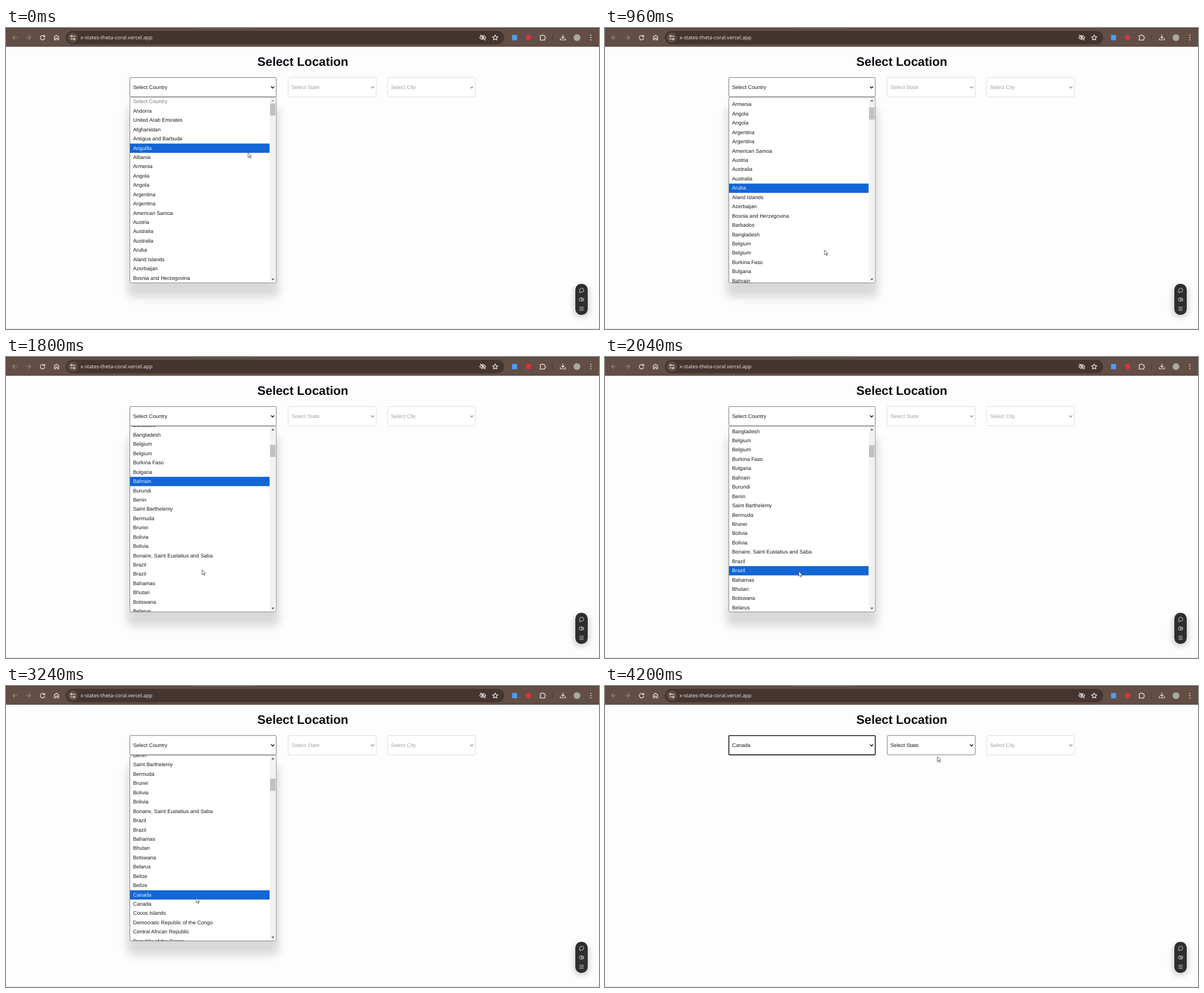
An HTML page for the animation above (4.32 s loop, 1051 by 533 pixels).

```html
<!DOCTYPE html>
<html lang="en">
<head>
<meta charset="utf-8">
<title>Select Location</title>
<style>
html, body { margin: 0; width: 100%; height: 100%; overflow: hidden; background: #fdfdfd; }
svg { display: block; width: 100vw; height: 100vh; }
text { font-family: "Liberation Sans", Arial, sans-serif; font-size: 9.28px; fill: #1c1c1c; white-space: pre; text-rendering: geometricPrecision; }
.title { font-size: 21.8px; font-weight: bold; fill: #0c0c14; }
.url { font-family: "Open Sans", "Noto Sans", sans-serif; font-size: 9.1px; fill: #f3ebe7; }
.icon { fill: none; stroke: #f0e6e1; stroke-width: 1.2; stroke-linecap: round; stroke-linejoin: round; }
.dim { stroke: #9b877d; }
.tool { fill: none; stroke: #c9cacc; stroke-width: 1; stroke-linecap: round; }
.chev { fill: none; stroke-width: 1.5; }
</style>
</head>
<body>
<svg viewBox="0 0 1051 533" preserveAspectRatio="none">
  <defs>
    <filter id="soft" x="-20%" y="-20%" width="140%" height="140%"><feGaussianBlur stdDeviation="8"/></filter>
    <filter id="glow" x="-80%" y="-50%" width="260%" height="200%"><feGaussianBlur stdDeviation="5"/></filter>
    <clipPath id="listClip"><rect x="219.7" y="123" width="258.8" height="328" rx="2"/></clipPath>
  </defs>
  <rect width="1051" height="533" fill="#fdfdfd"/>

  <g id="bar">
    <rect width="1051" height="33" fill="#634e45"/>
    <path d="M0 0H333V1H0ZM437 0H1051V1H437Z" fill="#4d3d36"/>
    <rect y="32.3" width="1051" height=".9" fill="#58453d"/>
    <rect x="106" y="5" width="777" height="24" rx="12" fill="#443530"/>
    <circle cx="118.5" cy="17" r="9" fill="#5f4c44"/>
    <g class="icon">
      <path class="dim" d="M19.5 17H12M15.3 13.5 11.8 17l3.5 3.5M36 17h7.5M40.2 13.5l3.5 3.5-3.5 3.5"/>
      <path d="M68 14.6A4 4 0 1 0 68.7 18M68.6 12.8V15.3H66"/>
      <path d="M85.7 15.6 89.5 12.8 93.3 15.6V21H91V17.8H88V21H85.7Z"/>
      <path d="M119 14.6H122.5M114.8 19.4H118"/>
      <circle cx="116" cy="14.6" r="1.4"/><circle cx="121" cy="19.4" r="1.4"/>
      <path d="M839.5 17Q845 9.8 850.5 17Q845 24 839.5 17ZM840.8 12.2 849.8 21.6"/>
      <circle cx="845" cy="17" r="1.7"/>
      <path d="M867 12.3 868.4 15.3 871.7 15.7 869.3 17.9 869.9 21.2 867 19.6 864.1 21.2 864.7 17.9 862.3 15.7 865.6 15.3Z"/>
      <path d="M946.6 13.5H949.2A1.5 1.5 0 0 1 952.2 13.5H954.8V16A1.5 1.5 0 0 1 954.8 19V21.3H946.6V18.8A1.5 1.5 0 0 0 946.6 16Z"/>
      <path d="M987 12V18M984.5 15.8 987 18.3 989.5 15.8M982.5 18.5V21H991.5V18.5"/>
    </g>
    <rect x="896.8" y="12.3" width="9" height="9.4" rx="1" fill="#4d9df2"/>
    <circle cx="926.3" cy="17" r="4.8" fill="#d83440"/>
    <path d="M968.5 11V23" stroke="#4a3a33"/>
    <circle cx="1012" cy="17" r="6" fill="#a5ac99"/>
    <g fill="#f0e6e1"><circle cx="1036.5" cy="13" r="1"/><circle cx="1036.5" cy="17" r="1"/><circle cx="1036.5" cy="21" r="1"/></g>
    <text class="url" x="132" y="20.4">x-states-theta-coral.vercel.app</text>
  </g>

  <text class="title" x="445.5" y="67.4">Select Location</text>
  <g id="selects"></g>

  <g id="menu">
    <rect x="215" y="140" width="269" height="337" rx="10" fill="#000" opacity=".14" filter="url(#soft)"/>
    <rect x="219.5" y="122.5" width="259.5" height="328.8" rx="2.5" fill="#fff" stroke="#858585"/>
    <g clip-path="url(#listClip)">
      <rect id="mark" x="219.7" width="247.6" height="16.44" fill="#1266d6"/>
      <g id="rows"></g>
      <rect x="467.5" y="123" width="11" height="328" fill="#f2f2f2"/>
      <rect id="thumb" x="468" width="9.6" height="21.5" fill="#c1c1c1"/>
      <path id="up" d="M470.4 130 473 127 475.6 130Z"/>
      <path d="M470.4 443.8 473 446.8 475.6 443.8Z" fill="#505050"/>
    </g>
  </g>

  <rect x="1005" y="456" width="30" height="57" rx="13" fill="#000" opacity=".15" filter="url(#glow)"/>
  <rect x="1009" y="453" width="22" height="55" rx="10.5" fill="#2c2e30"/>
  <g class="tool">
    <path d="M1016.8 468.2V464.2A3.6 3.6 0 1 1 1020.4 467.8Z"/>
    <rect x="1016" y="478" width="8.2" height="5.6" rx="2.8"/><circle cx="1021" cy="480.8" r="1.5"/>
    <path d="M1016.8 494.4H1023.4M1016.8 497.2H1023.4M1016.8 500H1023.4"/>
  </g>
  <path d="M0 532.4H1051" stroke="#e4e4e4"/>
  <path id="pointer" d="M0 0V8.8L2.1 7 3.4 10.2 4.8 9.6 3.5 6.5H6.2Z" fill="#fff" stroke="#3a3a3a" stroke-width=".8" stroke-linejoin="round"/>
</svg>
<script>
const LOOP = 4320, STEP = 120, PITCH = 16.44, TOP = 122.4;
const CLOSE = 3480, LOADED = 3720;
const names = `Select Country|Andorra|United Arab Emirates|Afghanistan|Antigua and Barbuda|Anguilla|Albania|Armenia|Angola|Angola|Argentina|Argentina|American Samoa|Austria|Australia|Australia|Aruba|Aland Islands|Azerbaijan|Bosnia and Herzegovina|Barbados|Bangladesh|Belgium|Belgium|Burkina Faso|Bulgaria|Bahrain|Burundi|Benin|Saint Barthelemy|Bermuda|Brunei|Bolivia|Bolivia|Bonaire, Saint Eustatius and Saba|Brazil|Brazil|Bahamas|Bhutan|Botswana|Belarus|Belize|Belize|Canada|Canada|Cocos Islands|Democratic Republic of the Congo|Central African Republic|Republic of the Congo`.split('|');

// Pointer keys: time, x, y
const path = [
  [0, 429, 220.5], [480, 389, 386.5], [720, 389, 393], [1080, 389, 393],
  [1440, 359.5, 368], [1920, 343.5, 379.5], [2640, 343.5, 379.5],
  [3120, 337, 375], [3480, 337, 375], [4200, 589, 125]
];
// Wheel scrolls: start, end, from, to
const scrolls = [[840, 1200, 0, 179], [1440, 1920, 179, 344], [2520, 3000, 344, 467.6]];

const $ = id => document.getElementById(id);
const set = (el, attrs) => {
  for (const k in attrs) el.setAttribute(k, attrs[k]);
  return el;
};
const add = (parent, tag, attrs) =>
  parent.appendChild(set(document.createElementNS('http://www.w3.org/2000/svg', tag), attrs));

const rows = names.map((name, i) => {
  const row = add($('rows'), 'text', { x: 225.2, y: TOP + 10.9 + i * PITCH });
  row.textContent = name;
  return row;
});

function makeSelect(x, w) {
  const g = $('selects');
  return {
    box: add(g, 'rect', { x, y: 87.7, width: w, height: 34.2, rx: 1.5, fill: '#fff' }),
    label: add(g, 'text', { x: x + 5.7, y: 108.2 }),
    chev: add(g, 'path', { class: 'chev', d: `M${x + w - 9.3} 103.4l2.8 2.9 2.8-2.9` })
  };
}
const country = makeSelect(219.5, 259.5);
const state = makeSelect(500.2, 156);
const city = makeSelect(676.5, 155.5);

function paintSelect(s, text, on, focus) {
  s.label.textContent = text;
  s.label.style.fill = on ? '#1c1c1c' : '#a3a3a3';
  set(s.chev, { stroke: on ? '#151515' : '#9c9c9c' });
  set(s.box, { stroke: focus ? '#1d1d1f' : on ? '#777' : '#dcdcdc', 'stroke-width': focus ? 1.6 : 1 });
}

function pointerAt(t) {
  const i = path.findIndex(k => k[0] > t);
  if (i < 0) return path[path.length - 1].slice(1);
  const [a, b] = [path[i - 1], path[i]];
  const p = (t - a[0]) / (b[0] - a[0]);
  return [1, 2].map(n => a[n] + (b[n] - a[n]) * p);
}

// The hovered row stays put until a scroll has settled.
function scrollAt(t) {
  let now = 0, settled = 0;
  for (const [start, end, from, to] of scrolls) {
    if (t <= start) break;
    const p = Math.min(1, (t - start) / (end - start));
    now = from + (to - from) * (1 - (1 - p) ** 2.35);
    settled = p < 1 ? from : to;
  }
  return [now, settled];
}

function render(ms) {
  const t = Math.floor((ms % LOOP) / STEP) * STEP;
  const open = t < CLOSE, loaded = t >= LOADED;
  const [x, y] = pointerAt(t);
  set($('pointer'), { transform: `translate(${x} ${y})` });

  paintSelect(country, open ? 'Select Country' : 'Canada', true, !open);
  paintSelect(state, 'Select State', loaded);
  paintSelect(city, 'Select City', false);

  set($('menu'), { visibility: open ? 'visible' : 'hidden' });
  if (!open) return;
  const [scroll, settled] = scrollAt(t);
  const hover = Math.floor((y - 2 - TOP + settled) / PITCH);
  set($('rows'), { transform: `translate(0 ${-scroll})` });
  set($('mark'), { y: TOP + hover * PITCH - scroll });
  set($('thumb'), { y: 133.6 + scroll * .0652 });
  set($('up'), { fill: scroll ? '#505050' : '#a3a3a3' });
  rows.forEach((row, i) => {
    row.style.fill = i === hover ? '#e6f0ff' : i ? '#1c1c1c' : '#7b7b7b';
  });
}

const begin = performance.now();
function tick() {
  render(performance.now() - begin);
  requestAnimationFrame(tick);
}
tick();
</script>
</body>
</html>
```
